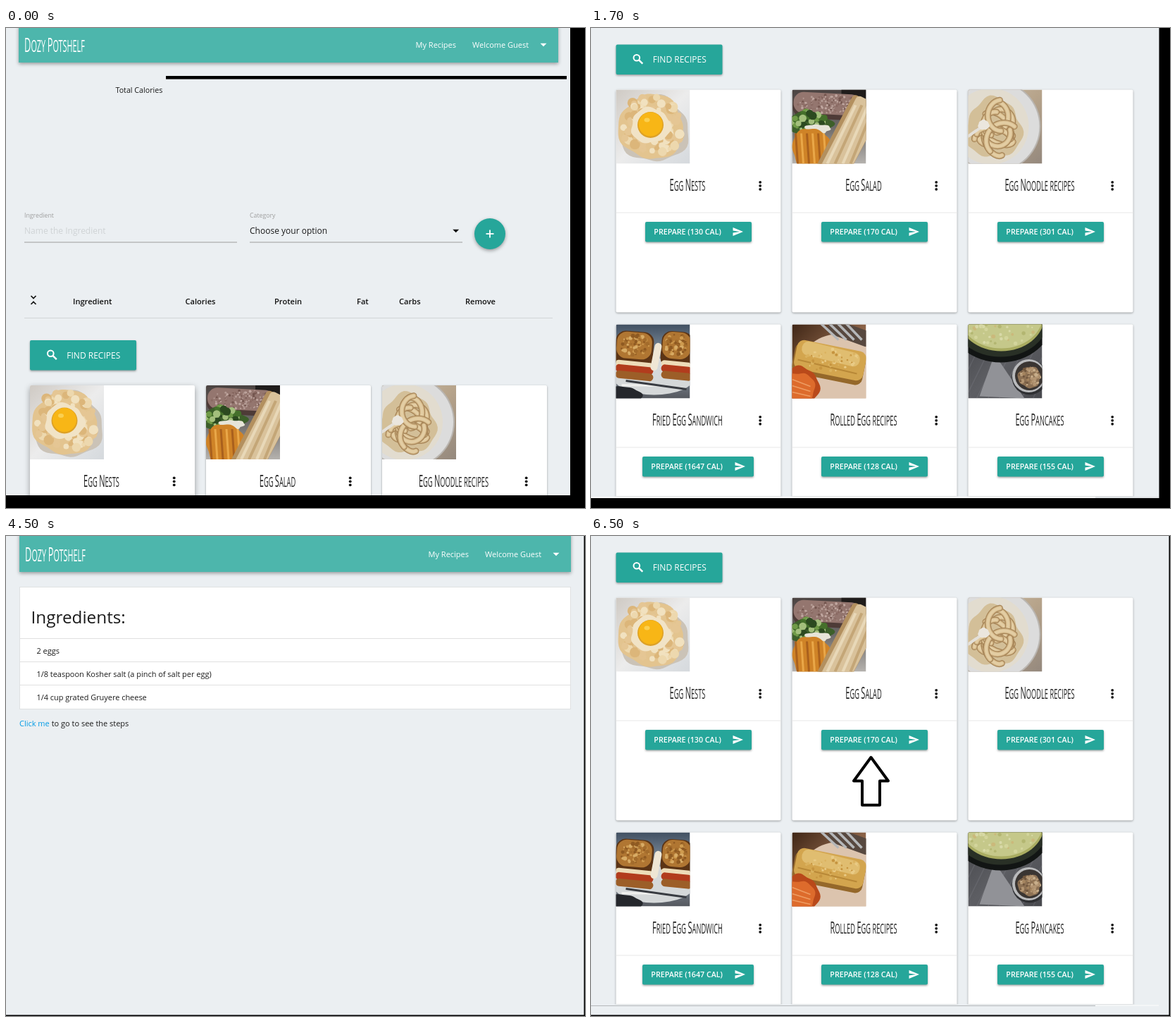
Animation of 822x681 px, one loop 8000 ms. Source, as an HTML page with a canvas:

```html
<!DOCTYPE html>
<html lang="en">
<head>
<meta charset="utf-8">
<title>Recipe finder</title>
<style>
  html, body { margin: 0; width: 100%; height: 100%; overflow: hidden; background: #000; }
  canvas { display: block; }
</style>
</head>
<body>
<canvas id="stage" width="822" height="681"></canvas>
<script>
const ctx = document.getElementById('stage').getContext('2d');
const W = 822, H = 681, TAU = Math.PI * 2, DISH = 105;
const BG = '#ebeff2', TEAL = '#26a69a', NAV = '#4db6ac', INK = '#1b1b1b';
const SANS = '"Open Sans", "Noto Sans", sans-serif';

// ---- drawing helpers ----
let seed = 1;
function rnd() {
  seed = (seed * 16807) % 2147483647;
  return seed / 2147483647;
}
const pick = list => list[Math.floor(rnd() * list.length)];

function rect(x, y, w, h, fill) {
  ctx.fillStyle = fill;
  ctx.fillRect(x, y, w, h);
}

function disc(x, y, r, fill, ry = r) {
  ctx.fillStyle = fill;
  ctx.beginPath();
  ctx.ellipse(x, y, r, ry, 0, 0, TAU);
  ctx.fill();
}

// Ellipse with a wavy edge.
function blob(x, y, rx, ry, fill, rough = 0.06) {
  const p = rnd() * TAU, q = rnd() * TAU;
  ctx.fillStyle = fill;
  ctx.beginPath();
  for (let a = 0; a < TAU; a += 0.1) {
    const r = 1 + rough * (Math.sin(3 * a + p) + 0.6 * Math.sin(7 * a + q));
    ctx.lineTo(x + Math.cos(a) * rx * r, y + Math.sin(a) * ry * r);
  }
  ctx.fill();
}

// Turned rounded box around a centre.
function slab(x, y, w, h, turn, fill, r = 6) {
  ctx.save();
  ctx.translate(x, y);
  ctx.rotate(turn);
  ctx.fillStyle = fill;
  ctx.beginPath();
  ctx.roundRect(-w / 2, -h / 2, w, h, r);
  ctx.fill();
  ctx.restore();
}

function line(stroke, width, x0, y0, x1, y1) {
  ctx.strokeStyle = stroke;
  ctx.lineWidth = width;
  ctx.beginPath();
  ctx.moveTo(x0, y0);
  ctx.lineTo(x1, y1);
  ctx.stroke();
}

function poly(fill, ...points) {
  ctx.fillStyle = fill;
  ctx.beginPath();
  points.forEach(([x, y]) => ctx.lineTo(x, y));
  ctx.closePath();
  ctx.fill();
}

function specks(n, x, y, w, h, size, ...colors) {
  for (let i = 0; i < n; i++) {
    const a = rnd() * TAU, d = Math.sqrt(rnd());
    disc(x + Math.cos(a) * d * w, y + Math.sin(a) * d * h, size * (0.5 + rnd()), pick(colors));
  }
}

function backdrop(x1, y1, ...colors) {
  const g = ctx.createLinearGradient(0, 0, x1, y1);
  colors.forEach((c, i) => g.addColorStop(i / (colors.length - 1), c));
  rect(0, 0, DISH, DISH, g);
}

function raised(x, y, w, h, r, fill, blur = 3, drop = 1.5) {
  ctx.save();
  ctx.shadowColor = 'rgba(0,0,0,.36)';
  ctx.shadowBlur = blur;
  ctx.shadowOffsetY = drop;
  ctx.fillStyle = fill;
  ctx.beginPath();
  ctx.roundRect(x, y, w, h, r);
  ctx.fill();
  ctx.restore();
}

function text(s, x, y, size, fill = INK, weight = 400) {
  ctx.font = `${weight} ${size}px ${SANS}`;
  ctx.fillStyle = fill;
  ctx.fillText(s, x, y);
  return ctx.measureText(s).width;
}

// Narrow small-caps display face: capitals full size, the rest a bit lower.
function display(s, x, y, size, fill, centred) {
  const runs = s.match(/[A-Z]|[^A-Z]+/g).map(t => {
    ctx.font = `400 ${/[A-Z]/.test(t) ? size : size * 0.84}px ${SANS}`;
    t = t.toUpperCase();
    return { t, font: ctx.font, w: ctx.measureText(t).width };
  });
  ctx.save();
  ctx.translate(x, y);
  ctx.scale(0.46, 1);
  ctx.fillStyle = fill;
  let at = centred ? -runs.reduce((sum, r) => sum + r.w, 0) / 2 : 0;
  for (const r of runs) {
    ctx.font = r.font;
    ctx.fillText(r.t, at, 0);
    at += r.w;
  }
  ctx.restore();
}

const caret = (x, y, fill) => poly(fill, [x - 4.5, y - 2.3], [x + 4.5, y - 2.3], [x, y + 2.3]);

// ---- dish pictures ----
function eggNest() {
  backdrop(105, 105, '#cfcac4', '#ececec', '#d5d9dd');
  blob(54, 56, 49, 47, '#cbc3b7');
  blob(50, 53, 46, 46, '#e3c48f', 0.05);
  specks(90, 50, 53, 44, 43, 5, '#edd8ae', '#e5c694', '#f1e1bf', '#dcb67a');
  blob(49, 51, 28, 25, '#f1e3c6');
  disc(49, 50, 18.5, '#dda126');
  disc(49, 49, 17, '#f8b616');
  disc(44, 43, 4, '#fbd050', 3);
}

function eggSalad() {
  backdrop(0, 105, '#4b4341', '#6d6a69', '#b5b2ae');
  rect(70, 0, 35, 42, '#1f1c1b');
  slab(50, 24, 98, 36, 0.05, '#4e3b37', 16);
  slab(50, 20, 96, 30, 0.05, '#94766f', 14);
  specks(160, 50, 20, 44, 13, 1.3, '#b39a93', '#74564f', '#bfa69f', '#8a6a63');
  blob(24, 48, 32, 16, '#3d5f2a', 0.1);
  specks(45, 24, 45, 24, 13, 4, '#6f9a47', '#45702b', '#a3bf7c', '#2c4a20');
  blob(36, 56, 18, 7, '#e6e4d8', 0.1);
  blob(27, 84, 27, 30, '#cf8327', 0.05);
  for (let i = 0; i < 6; i++) line(i % 2 ? '#e9a748' : '#a9601d', 3, 5 + i * 8, 62, 8 + i * 8, 105);
  slab(78, 74, 46, 130, 0.48, '#b3905f');
  slab(81, 74, 40, 130, 0.48, '#d9c29b');
  for (let i = 0; i < 4; i++) line(i % 2 ? '#c4a677' : '#e8d8b8', 4, 90 + i * 9, 22, 50 + i * 11, 105);
}

function eggNoodles() {
  backdrop(105, 105, '#c9bda9', '#b7a48b', '#94887d');
  disc(38, 52, 65, '#b9b5b0');
  disc(38, 52, 63, '#dcdcdc');
  disc(32, 52, 54, '#e2dccf');
  blob(36, 55, 40, 42, '#d3bf98', 0.08);
  ctx.lineCap = 'round';
  for (let i = 0; i < 13; i++) {
    const x = 36 + rnd() * 16, y = 34 + rnd() * 42, rx = 12 + rnd() * 16, ry = 10 + rnd() * 14;
    const turn = rnd() * TAU;
    ['#a78558', '#d3b788', '#e3cda3'].forEach((c, k) => {
      ctx.strokeStyle = c;
      ctx.lineWidth = 9 - k * 2.5;
      ctx.beginPath();
      ctx.ellipse(x, y, rx, ry, turn, 0, 3);
      ctx.stroke();
    });
  }
  line('#e4e0d9', 4, 0, 66, 20, 52);
  ctx.lineCap = 'butt';
  blob(22, 50, 8, 7, '#ebe6de');
}

function eggSandwich() {
  backdrop(0, 105, '#415062', '#93a2b0', '#55585f');
  disc(54, 74, 58, '#d5d8d9', 26);
  for (const [x, w] of [[26, 54], [86, 44]]) {
    slab(x, 36, w, 52, 0.08, '#5b3415', 14);
    slab(x, 30, w - 4, 38, 0.08, '#b07632', 14);
    specks(60, x, 29, w / 2 - 6, 15, 2, '#cf9b4f', '#8f5a22', '#d8ac66', '#a36c2c');
    slab(x, 57, w, 9, 0.1, '#eddcb8');
    slab(x, 64, w, 11, 0.1, '#b23c1d');
    slab(x, 73, w, 11, 0.1, '#9c5e28');
  }
  slab(57, 46, 10, 40, 0.2, '#efe6d4');
  line('#f0f0ee', 3, 8, 86, 62, 87);
  line('#393c42', 3, 14, 80, 100, 92);
  blob(10, 102, 26, 14, '#25272c');
}

function rolledEgg() {
  backdrop(105, 105, '#3f2616', '#8a6247', '#d8bda4');
  disc(64, 70, 56, '#dcc4ae');
  slab(82, 12, 64, 22, 0.35, '#57483f');
  for (let i = 0; i < 4; i++) line('#b5b7b9', 3.5, 40 + i * 12, -2, 66 + i * 11, 22);
  slab(52, 56, 102, 44, 0.2, '#95682a', 10);
  slab(54, 51, 100, 42, 0.2, '#d3a54e', 10);
  slab(55, 42, 84, 20, 0.24, '#e0bd70', 9);
  line('#b88837', 2, 8, 50, 92, 70);
  specks(50, 54, 50, 40, 16, 1.6, '#e9cb86', '#c6943f', '#dab25f');
  blob(12, 88, 26, 28, '#b9491a');
  blob(10, 92, 22, 24, '#dd6b2c');
  for (let i = 0; i < 3; i++) line('#ee9c62', 1.5, 0, 78 + i * 9, 26, 88 + i * 7);
}

function pancakes() {
  backdrop(105, 105, '#45464a', '#5d5e63', '#47484d');
  for (let i = 0; i < 8; i++) line('rgba(150,150,158,.2)', 1.5, i * 16 - 20, 105, i * 16 + 12, 40);
  poly('#919297', [34, 52], [44, 52], [80, 105], [16, 102]);
  disc(46, -8, 74, '#121514', 62);
  disc(46, -8, 68, '#293026', 54);
  disc(47, -11, 61, '#a9ac61', 49);
  disc(47, -13, 59, '#c5c88a', 47);
  specks(45, 48, 10, 46, 20, 2, '#d3d59c', '#b3b671', '#cbb97b', '#d8d9a8');
  disc(87, 75, 25, '#2f3033');
  disc(86, 73, 23.5, '#b9babc');
  disc(87, 73, 20.5, '#3a3532');
  blob(87, 75, 16, 15, '#8d7154');
  specks(60, 87, 75, 15, 14, 1.8, '#b39572', '#71573e', '#a4845f', '#c7ad8a');
}

const dishes = [
  ['Egg Nests', 130, eggNest],
  ['Egg Salad', 170, eggSalad],
  ['Egg Noodle recipes', 301, eggNoodles],
  ['Fried Egg Sandwich', 1647, eggSandwich],
  ['Rolled Egg recipes', 128, rolledEgg],
  ['Egg Pancakes', 155, pancakes]
];

// ---- page parts ----
function card(x, y, [name, cal, paint], hover) {
  raised(x, y, 234, 316, 2, '#fff', hover ? 9 : 3, hover ? 3 : 1);
  ctx.save();
  ctx.translate(x, y);
  ctx.beginPath();
  ctx.roundRect(0, 0, DISH, DISH, [2, 0, 0, 0]);
  ctx.clip();
  seed = 1000 + cal;
  paint();
  ctx.restore();

  display(name, x + 101.5, y + 143.5, 24, '#222', true);
  for (let i = -1; i <= 1; i++) disc(x + 204.7, y + 136.3 + i * 5, 1.9, '#111');
  rect(x, y + 174, 234, 1, '#e8e8e8');

  const label = `PREPARE (${cal} CAL)`;
  const w = cal > 999 ? 158 : 151, bx = Math.floor(x + 117 - w / 2), by = y + 187.5;
  raised(bx, by, w, 28.5, 2, TEAL);
  text(label, bx + 12.3, by + 18, 10.7, '#fff', 600);
  const ix = bx + w - 26.5, iy = by + 14;
  poly('#fff', [ix, iy - 6], [ix + 14.5, iy], [ix, iy + 6], [ix, iy + 1.4], [ix + 10, iy], [ix, iy - 1.4]);
}

function recipes(x, y, hover) {
  raised(x, y, 151, 42.5, 2, TEAL);
  ctx.strokeStyle = '#fff';
  ctx.lineWidth = 2;
  ctx.beginPath();
  ctx.arc(x + 29.3, y + 18.7, 4.3, 0, TAU);
  ctx.stroke();
  line('#fff', 2.4, x + 32.4, y + 21.8, x + 37.8, y + 27.2);
  text('FIND RECIPES', x + 52.3, y + 25.5, 12, '#fff');
  dishes.forEach((d, i) =>
    card(x + i % 3 * 250, y + 64 + Math.floor(i / 3) * 333, d, hover && i === 0));
}

function navbar(x, w, h) {
  raised(x, -4, w, h + 4, 0, NAV, 5, 2);
  display('Dozy Potshelf', x + 8, h - 15, 28, '#fff');
  text('My Recipes', x + w - 202.5, h - 21, 11, '#fff');
  text('Welcome Guest', x + w - 122, h - 21, 11, '#fff');
  caret(x + w - 21, h - 25, '#fff');
}

function field(x, label, value, fill) {
  text(label, x, 269, 8.75, '#9e9e9e');
  text(value, x, 292, 12, fill);
  rect(x, 303.5, 302, 1, '#9e9e9e');
}

function home() {
  navbar(18, 766, 49);
  rect(227, 68, 569, 4.6, '#000');
  text('Total Calories', 155.5, 92.3, 10.7);

  field(26, 'Ingredient', 'Name the Ingredient', '#cfd3d5');
  field(346, 'Category', 'Choose your option', INK);
  caret(638.7, 288, '#111');

  raised(665, 270, 44, 44, 22, TEAL, 5, 2);
  line('#fff', 1.8, 681.5, 292, 692.5, 292);
  line('#fff', 1.8, 687, 286.5, 687, 297.5);

  for (const side of [-1, 1]) {
    line('#111', 1.7, 39 + side * 3.5, 380, 39 - side * 0.5, 384);
    line('#111', 1.7, 39 + side * 3.5, 392, 39 - side * 0.5, 388);
  }
  const heads = { Ingredient: 95, Calories: 254.5, Protein: 381, Fat: 498, Carbs: 558, Remove: 652 };
  for (const h in heads) text(h, heads[h], 392, 11.1, '#111', 600);
  rect(26, 411, 750, 1, '#d2d5d7');
  recipes(34, 443, true);
}

function results() {
  ctx.save();
  ctx.beginPath();
  ctx.rect(0, 0, 806, 664.5);
  ctx.clip();
  recipes(35.5, 23.5);
  ctx.restore();
}

function arrow(x, top, shoulder, half, stem) {
  const bottom = 381.8;
  ctx.beginPath();
  [[0, top], [half, shoulder], [stem, shoulder], [stem, bottom],
   [-stem, bottom], [-stem, shoulder], [-half, shoulder]]
    .forEach(([dx, y]) => ctx.lineTo(x + dx, y));
  ctx.closePath();
  ctx.fillStyle = '#fff';
  ctx.strokeStyle = '#000';
  ctx.lineWidth = 4;
  ctx.lineJoin = 'round';
  ctx.fill();
  ctx.stroke();
}

function list() {
  results();
  rect(0, 665, 806, 2, '#dfe2e4');
  rect(0, 665, 716, 2, '#fafafa');
}

function firstPick() {
  list();
  arrow(149.7, 309.5, 345.5, 27, 13.5);
}

function ingredients() {
  navbar(19, 783, 51);
  rect(19, 72, 783, 174, '#dfe1e2');
  rect(20, 73, 781, 172, '#fff');
  text('Ingredients:', 35.5, 123.5, 24.3);
  ['2 eggs', '1/8 teaspoon Kosher salt (a pinch of salt per egg)', '1/4 cup grated Gruyere cheese']
    .forEach((s, i) => {
      rect(20, 145 + i * 33, 781, 1, '#e0e0e0');
      text(s, 43.5, 166.5 + i * 33, 10.95);
    });
  const w = text('Click me', 19, 269.8, 11, '#039be5');
  text(' to go to see the steps', 19 + w, 269.8, 11);
}

function secondPick() {
  results();
  rect(0, 666, 716, 1, '#b5b8ba');
  rect(716, 665, 90, 2, '#f4f6f7');
  arrow(397.5, 314, 347.5, 24.5, 12.5);
}

// ---- timeline: start, visible page size, painter ----
const scenes = [
  [0, 801, 663, home],
  [500, 806.5, 667, list],
  [2500, 806.5, 667, firstPick],
  [4500, 820.5, 679.5, ingredients],
  [6500, 820.5, 679.5, secondPick]
];
const LOOP = 8000;
let shown = -1;

function frame(now) {
  const t = now % LOOP;
  const i = scenes.findLastIndex(s => t >= s[0]);
  if (i !== shown) {
    const [, w, h, paint] = scenes[i];
    rect(0, 0, W, H, BG);
    paint();
    rect(w, 0, W - w, H, '#000');
    rect(0, h, W, H - h, '#000');
    shown = i;
  }
  requestAnimationFrame(frame);
}
frame(performance.now());
</script>
</body>
</html>
```
